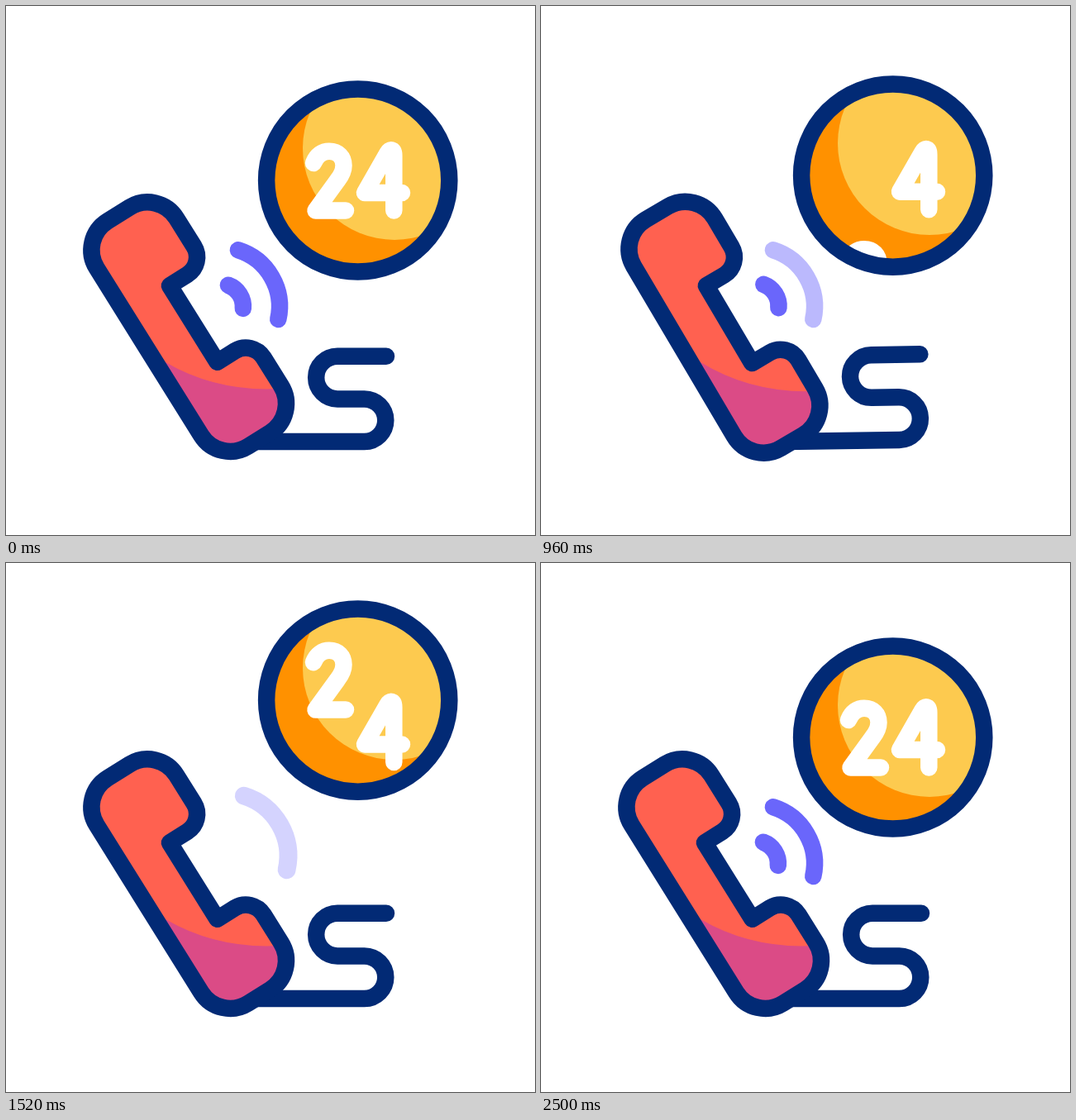
An HTML page with a canvas for the animation above (2.78 s loop, 640 px wide and 640 px high).

```html
<!DOCTYPE html>
<html lang="en">
<head>
<meta charset="utf-8">
<title>24 hour phone support</title>
<style>
  html, body { margin: 0; width: 100%; height: 100%; overflow: hidden; background: #fff; }
  canvas { display: block; width: 640px; height: 640px; }
</style>
</head>
<body>
<canvas id="stage" width="640" height="640"></canvas>
<script>
const ctx = document.getElementById('stage').getContext('2d');
const LOOP = 2780, TICK = 20, LINE = 20.5, DEG = Math.PI / 180;
const NAVY = '#022a75', RED = '#ff6150', PINK = '#db4b86', VIOLET = '#6a66fb',
      YELLOW = '#fdca4f', ORANGE = '#ff9100', WHITE = '#fff';

const smooth = p => p * p * (3 - 2 * p);

// Eased value at tick t from [tick, value] keys; a zero-length span is a hard cut.
function track(keys, t) {
  if (t <= keys[0][0]) return keys[0][1];
  for (let i = 1; i < keys.length; i++) {
    const [t0, v0] = keys[i - 1], [t1, v1] = keys[i];
    if (t < t1) return v0 + (v1 - v0) * smooth((t - t0) / (t1 - t0));
  }
  return keys[keys.length - 1][1];
}

const badgeKeys = [[15, 0], [38, -45.5], [58, 33], [77, -45.5], [98, 33], [125, 0]];
const digitKeys = [[10, 0], [32, -32], [53, 150], [75, -25], [115, 0]];
const ringKeys = [10, 16, 22, 27.5, 33, 38, 44, 50, 56, 61, 67]
  .map((t, i) => [t, i % 10 === 0 ? 0 : i % 2 ? 1 : -1]);

const waves = [
  { radius: 27.4, from: -70, to: 5,
    grow: [[10, 0], [35, 1], [35, 0], [45, 0], [65, 1], [73, 1], [73, 0]],
    fade: [[17, 1], [35, 0], [45, 1], [51, 1], [70, 0], [76, 0], [88, 1]] },
  { radius: 71.5, from: -72.6, to: 12.6,
    grow: [[10, 0], [29, 1], [29, 0], [63, 0], [82, 1], [82, 0]],
    fade: [[14, 1], [28, 0], [41, 0], [56, 1], [67, 1], [81, 0], [95, 0], [113, 1]] }
];

const cord = new Path2D('M295 527H433.5a25.8 25.8 0 0 0 0-51.6H401a25.8 25.8 0 0 1 0-51.6H460');
const two = new Path2D('M372 190C376 180 383 175.7 391 175.7C402 175.7 408.5 183 408.5 193' +
  'C408.5 200 405 206 401 211L374.5 247.5H411');
const four = new Path2D('M469.3 247.5V181C469.3 173 464.5 172.5 461.5 178L434 226H479');
const shade = new Path2D('M185 426L193 431Q255 467 330 463L380 463V600H185Z');

// Handset in its own upright axes, tilted when drawn.
function handsetPath() {
  const left = -75, neck = -11.5, right = 38.8;
  const [top, notchA, notchB, bottom] = [285.8, 391.8, 500.7, 607];
  const path = new Path2D(), upright = new Path2D();
  upright.moveTo(left, 446);
  upright.arcTo(left, top, right, top, 41.3);
  upright.arcTo(right, top, right, notchA, 41.3);
  upright.arcTo(right, notchA, neck, notchA, 25);
  upright.lineTo(neck, notchA);
  upright.lineTo(neck, notchB);
  upright.arcTo(right, notchB, right, bottom, 25);
  upright.arcTo(right, bottom, left, bottom, 41.3);
  upright.arcTo(left, bottom, left, 446, 41.3);
  upright.closePath();
  path.addPath(upright, new DOMMatrix().rotate(-32));
  return path;
}
const handset = handsetPath();

function layer(draw) {
  ctx.save();
  draw();
  ctx.restore();
}

function rotateAbout(x, y, degrees) {
  ctx.translate(x, y);
  ctx.rotate(degrees * DEG);
  ctx.translate(-x, -y);
}

function stroke(path, color) {
  ctx.strokeStyle = color;
  ctx.stroke(path);
}

function disc(x, y, r) {
  const path = new Path2D();
  path.arc(x, y, r, 0, 2 * Math.PI);
  return path;
}

function fill(path, color) {
  ctx.fillStyle = color;
  ctx.fill(path);
}

function drawPhone(t) {
  const swing = track(ringKeys, t);
  layer(() => {
    rotateAbout(300, 527, -1.75 * swing);
    stroke(cord, NAVY);
  });
  layer(() => {
    rotateAbout(200, 418, 2.8 * swing);
    fill(handset, RED);
    layer(() => {
      ctx.clip(handset);
      fill(shade, PINK);
    });
    stroke(handset, NAVY);
  });
}

function drawWave({ radius, from, to, grow, fade }, t) {
  layer(() => {
    const scale = 1 + 0.09 * track(grow, t);
    ctx.globalAlpha = track(fade, t);
    ctx.translate(180, 493);
    ctx.scale(scale, scale);
    ctx.translate(-180, -493);
    const path = new Path2D();
    path.arc(259.5, 363.5, radius, from * DEG, to * DEG);
    stroke(path, VIOLET);
  });
}

function drawDigit(path, t) {
  layer(() => {
    ctx.translate(0, track(digitKeys, t));
    stroke(path, WHITE);
  });
}

const badge = disc(425.7, 211, 110.6), glow = disc(470, 172, 111);

function drawBadge(t) {
  layer(() => {
    ctx.translate(0, track(badgeKeys, t));
    layer(() => {
      ctx.clip(badge);
      fill(badge, ORANGE);
      fill(glow, YELLOW);
      drawDigit(two, t);
      drawDigit(four, t - 10);
    });
    stroke(badge, NAVY);
  });
}

function render(ms) {
  const t = (ms % LOOP) / TICK;
  fill(new Path2D('M0 0H640V640H0Z'), WHITE);
  ctx.lineWidth = LINE;
  ctx.lineCap = ctx.lineJoin = 'round';
  drawPhone(t);
  waves.forEach(wave => drawWave(wave, t));
  drawBadge(t);
}

const start = performance.now();
function loop(now) {
  render(Math.max(0, now - start));
  requestAnimationFrame(loop);
}
render(0);
requestAnimationFrame(loop);
</script>
</body>
</html>
```
